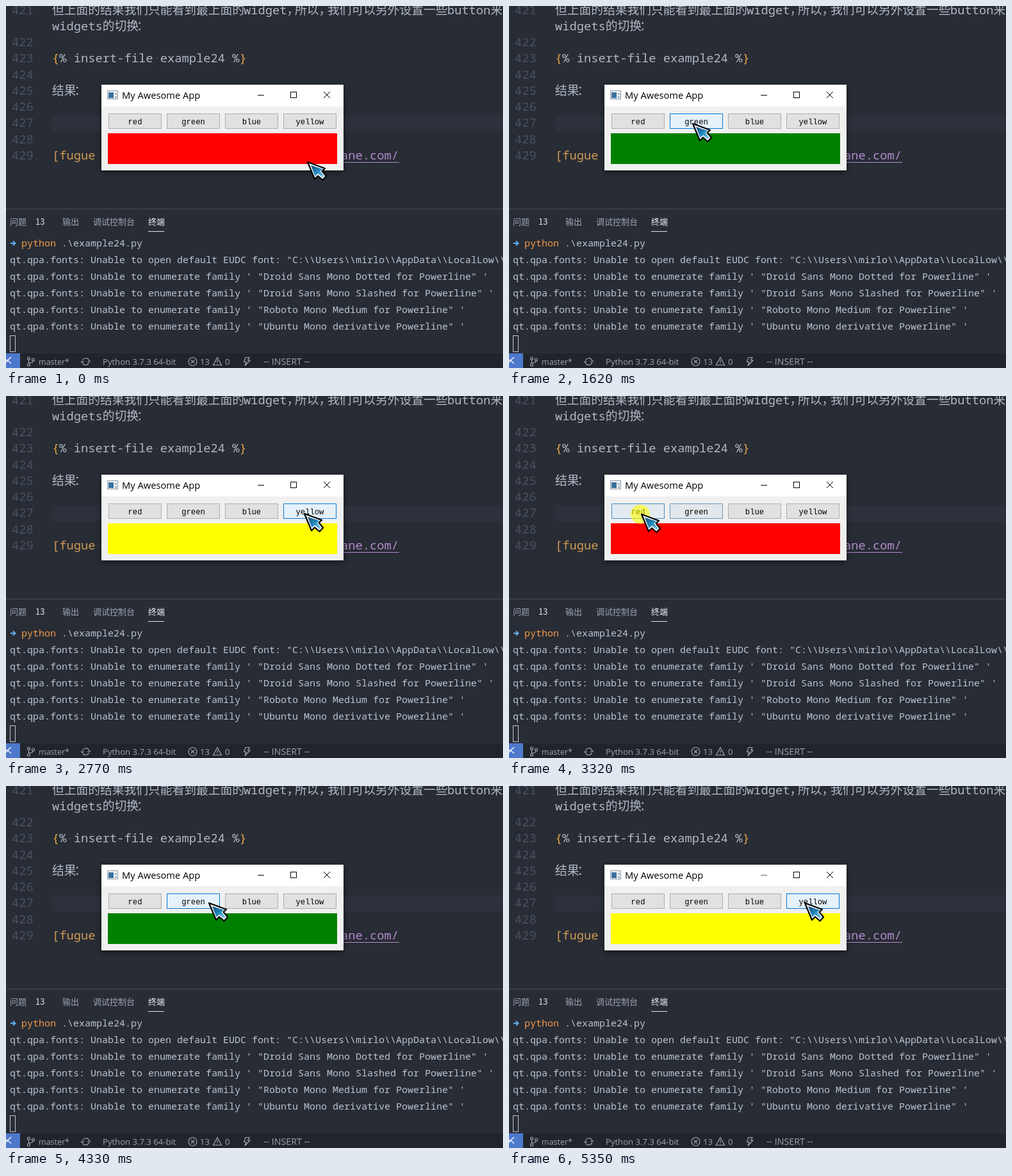
An HTML page for the animation above (5.58 s loop, 776x566 px).

```html
<!DOCTYPE html>
<html lang="zh-CN">
<head>
<meta charset="utf-8">
<style>
html, body { margin: 0; width: 100%; height: 100%; overflow: hidden; background: #282c34; }
svg { display: block; }
text { white-space: pre; }
.code { font: 18.75px "Noto Sans Mono", "Noto Sans CJK SC", "Noto Sans CJK", monospace; fill: #b1b8c4; }
.num { fill: #495162; }
.term { font: 500 15px "Noto Sans Mono", monospace; fill: #bac4d2; }
.tabs { font: 13px "Noto Sans CJK SC", "Noto Sans CJK", sans-serif; fill: #9da5b4; }
.ui { font: 13.1px "Open Sans", sans-serif; fill: #9da5b4; }
.label { font: 12.2px "Liberation Mono", monospace; fill: #000; text-anchor: middle; }
.line { fill: none; stroke: #9da5b4; stroke-width: 1.2; }
</style>
</head>
<body>
<svg width="776" height="566" viewBox="0 0 776 566">
  <defs>
    <linearGradient id="steel" x1="0" y1="0" x2="1" y2="1">
      <stop offset="0" stop-color="#174f78"/>
      <stop offset=".5" stop-color="#2388bd"/>
      <stop offset="1" stop-color="#9cdcf0"/>
    </linearGradient>
    <filter id="shadow" x="-10%" y="-20%" width="120%" height="150%">
      <feDropShadow dx="0" dy="3" stdDeviation="6" flood-opacity=".5"/>
    </filter>
  </defs>
  <rect width="776" height="566" fill="#282c34"/>
  <rect x="72" y="171" width="704" height="25" fill="#2c313c"/>
  <g class="code" id="editor"></g>
  <path d="M523 244.5H614" stroke="#b48ccf"/>

  <path d="M0 317.5H776" stroke="#484c53"/>
  <g class="tabs">
    <text x="6" y="342">问题</text>
    <text x="46" y="342" fill="#e6e8ec">13</text>
    <text x="88" y="342">输出</text>
    <text x="136" y="342">调试控制台</text>
    <text x="222" y="342" fill="#f0f1f3">终端</text>
  </g>
  <path d="M222 352.5H247" stroke="#e0e2e6"/>
  <g class="term" id="terminal"></g>
  <path d="M7 371H14M11 367.500L14.500 371L11 374.500" fill="none" stroke="#61afef" stroke-width="1.800"/>
  <rect x="6.5" y="515.5" width="8" height="25" fill="none" stroke="#c3c8d1"/>

  <rect y="543" width="776" height="23" fill="#21252b"/>
  <rect y="543" width="22" height="23" fill="#4d78cc"/>
  <path d="M-3 550L2 555L-3 560M8 549L2.500 554L8 559" fill="none" stroke="#fff" stroke-width="1.300"/>
  <g class="line">
    <circle cx="35.500" cy="551" r="2"/><circle cx="35.500" cy="561" r="2"/><circle cx="42.500" cy="553" r="2"/>
    <path d="M35.500 553V559M42.500 555Q42 558 36 558"/>
    <path d="M119.500 554.500A5.500 5.500 0 0 1 129.500 553.500M129.500 557.500A5.500 5.500 0 0 1 119.500 558.500M117 555.500L119 557.500L121.500 555.500M127.500 556.500L130 554.500L132 556.500"/>
    <circle cx="291.500" cy="556" r="6.500"/><path d="M289 553.500L294 558.500M294 553.500L289 558.500"/>
    <path d="M330 549.500L336.500 561.500H323.500ZM330 553.500V557.500M330 559V560"/>
    <path d="M374 549.500H380L377.500 554H381L373 562.500L375 556.500H371.500Z"/>
  </g>
  <g class="ui">
    <text x="51" y="561" style="font-size:12.5px">master*</text>
    <text x="151" y="561">Python 3.7.3 64-bit</text>
    <text x="303" y="561">13</text><text x="342" y="561">0</text>
    <text x="402" y="561" style="font-size:14.2px">-- INSERT --</text>
  </g>

  <rect x="149" y="123" width="378" height="134" fill="#f0f0f0" filter="url(#shadow)"/>
  <rect x="149" y="123" width="378" height="34" fill="#fff"/>
  <rect x="158.500" y="132.500" width="16" height="13" fill="#f4f6f8" stroke="#8b98a5"/>
  <rect x="160" y="135" width="8" height="9" fill="#39729f"/>
  <path d="M170 136H173V139H170ZM170 141H173V144H170Z" fill="#a8b4bf"/>
  <text class="ui" x="181" y="145" style="font-size:14.7px;fill:#000">My Awesome App</text>
  <g fill="none" stroke="#000">
    <path id="minimize" d="M393 139.500H403"/>
    <rect x="444.500" y="134.500" width="9" height="9"/>
    <path d="M496 134L506 144M506 134L496 144"/>
  </g>
  <g id="buttons"></g>
  <rect id="panel" x="159" y="199" width="358" height="48"/>
  <g id="search">
    <rect x="367" y="134" width="34" height="34" rx="5" fill="#f0484c"/>
    <circle cx="383" cy="150" r="8" fill="none" stroke="#fff" stroke-width="1.800"/>
    <path d="M389 156L394 161" stroke="#fff" stroke-width="1.800"/>
    <path d="M393 139.500H403" stroke="#333"/>
  </g>
  <g id="cursor">
    <circle id="halo" cx="-1" cy="1" r="15" fill="#ff0" opacity=".6"/>
    <g stroke-linejoin="round">
      <path d="M1 1L28 11L23.500 15L30 23L24.500 29L17 22.500L12 27.500Z" fill="#fff" stroke="#000" stroke-width="2.200"/>
      <path d="M6 6L24.500 12L20.500 15L27 23L24.500 25.500L17 19L12.500 23Z" fill="url(#steel)"/>
    </g>
  </g>
</svg>
<script>
const $ = id => document.getElementById(id);
const LOOP = 5580;

function addText(parent, x, y, string, fill, cls) {
  const node = document.createElementNS('http://www.w3.org/2000/svg', 'text');
  node.setAttribute('x', x);
  node.setAttribute('y', y);
  if (fill) node.style.fill = fill;
  if (cls) node.setAttribute('class', cls);
  node.textContent = string;
  parent.append(node);
}

// Editor: rows are 25.25 px apart and the first line wraps.
const rowY = row => 12.5 + row * 25.25;
const code = (x, row, string, fill) => addText($('editor'), x, rowY(row), string, fill);
for (let n = 421; n < 430; n++) {
  addText($('editor'), 9, rowY(n - 421 + (n > 421)), n, null, 'num');
}
code(72, 0, '但上面的结果我们只能看到最上面的');
code(371, 0, 'widget，');
code(451, 0, '所以，');
code(502, 0, '我们可以另外设置一些');
code(689, 0, 'button来');
code(72, 1, 'widgets的切换');
code(204, 1, '：');
code(72, 3, '{', '#e5a64a');
code(83.25, 3, '% insert-file example24 %');
for (const column of [2, 14, 24]) code(72 + column * 11.25, 3, '·', '#414751');
code(364.5, 3, '}', '#e5a64a');
code(72, 5, '结果');
code(106.5, 5, '：');
code(72, 9, '[fugue', '#d19a56');
code(139.5, 9, '·', '#414751');
code(523, 9, 'ane.com/', '#b48ccf');

const term = (x, row, string, fill) => addText($('terminal'), x, 376 + row * 26, string, fill);
term(24, 0, 'python', '#f2994a');
term(87, 0, '.\\example24.py');
term(6, 1, 'qt.qpa.fonts: Unable to open default EUDC font: "C:\\\\Users\\\\mirlo\\\\AppData\\\\LocalLow\\\\');
['Droid Sans Mono Dotted for', 'Droid Sans Mono Slashed for', 'Roboto Mono Medium for', 'Ubuntu Mono derivative']
  .forEach((name, i) => term(6, i + 2, `qt.qpa.fonts: Unable to enumerate family ' "${name} Powerline" '`));

const names = ['red', 'green', 'blue', 'yellow'];
const buttonX = i => 160 + i * 91;
$('buttons').innerHTML = names.map((name, i) => {
  const box = `x="${buttonX(i) + .5}" y="168.5" width="82" height="23"`;
  return `<rect ${box} fill="#e1e1e1" stroke="#adadad"/>
    <rect ${box} fill="#e5f1fb" stroke="#0078d7" class="hover"/>
    <text class="label" x="${buttonX(i) + 41.5}" y="185">${name}</text>`;
}).join('');
const hovers = document.querySelectorAll('.hover');

// Bursts of screen updates: first, last, count.
const bursts = [[70, 530, 7], [770, 770, 1], [910, 1390, 7], [1470, 2020, 8], [2080, 2610, 8], [2690, 3240, 8],
  [3320, 3860, 8], [3940, 3940, 1], [4110, 4640, 8], [4730, 5190, 7], [5350, 5350, 1]];

// Pointer path: time, x, y.
const path = [[0, 470, 243], [530, 205, 181], [910, 206, 181], [1150, 245, 190], [1390, 283, 183],
  [1540, 285, 183], [2020, 367, 180], [2150, 367, 180], [2610, 465, 183], [2850, 465, 183],
  [3240, 206, 184], [3400, 206, 184], [3790, 275, 180], [3940, 283, 182], [4110, 283, 182],
  [4500, 368, 182], [4580, 368, 182], [4810, 448, 184], [4960, 461, 182], [LOOP, 461, 182]];

// Clicks: time, button.
const clicks = [[1470, 1], [2080, 2], [2690, 3], [3320, 0], [4110, 1], [4560, 2], [5040, 3]];
const colors = ['#f00', '#008000', '#00f', '#ff0'];

function snap(t) {
  let shown = 0;
  for (const [first, last, count] of bursts) {
    if (t < first) break;
    const step = (last - first) / (count - 1) || 1;
    shown = Math.min(last, first + Math.floor((t - first) / step + 1e-6) * step);
  }
  return shown;
}

function pointer(t) {
  if (t <= 0) return path[0].slice(1);
  const k = path.findIndex(p => p[0] >= t);
  const [t0, x0, y0] = path[k - 1], [t1, x1, y1] = path[k];
  const f = (t - t0) / (t1 - t0);
  return [x0 + (x1 - x0) * f, y0 + (y1 - y0) * f];
}

// Share of the last 250 ms spent over a button.
function hover(i, t) {
  let hits = 0;
  for (let k = 0; k < 10; k++) {
    const [x, y] = pointer(t - k * 25);
    if (x >= buttonX(i) && x < buttonX(i) + 83 && y >= 168 && y < 192) hits++;
  }
  return hits / 10;
}

const show = (id, on) => $(id).setAttribute('visibility', on ? 'visible' : 'hidden');

function draw(now) {
  const t = snap(now % LOOP);
  const [x, y] = pointer(t).map(Math.round);
  const [clickTime, button] = clicks.filter(c => c[0] <= t).pop() || [-1000, 0];
  $('cursor').setAttribute('transform', `translate(${x} ${y})`);
  $('panel').setAttribute('fill', colors[button]);
  $('minimize').setAttribute('stroke', t < 5040 ? '#000' : '#666');
  show('halo', t - clickTime < 75);
  show('search', t >= 4600 && t < 5040);
  hovers.forEach((node, i) => node.setAttribute('opacity', hover(i, t)));
}

const start = performance.now();
function tick() {
  draw(performance.now() - start);
  requestAnimationFrame(tick);
}
tick();
</script>
</body>
</html>
```
